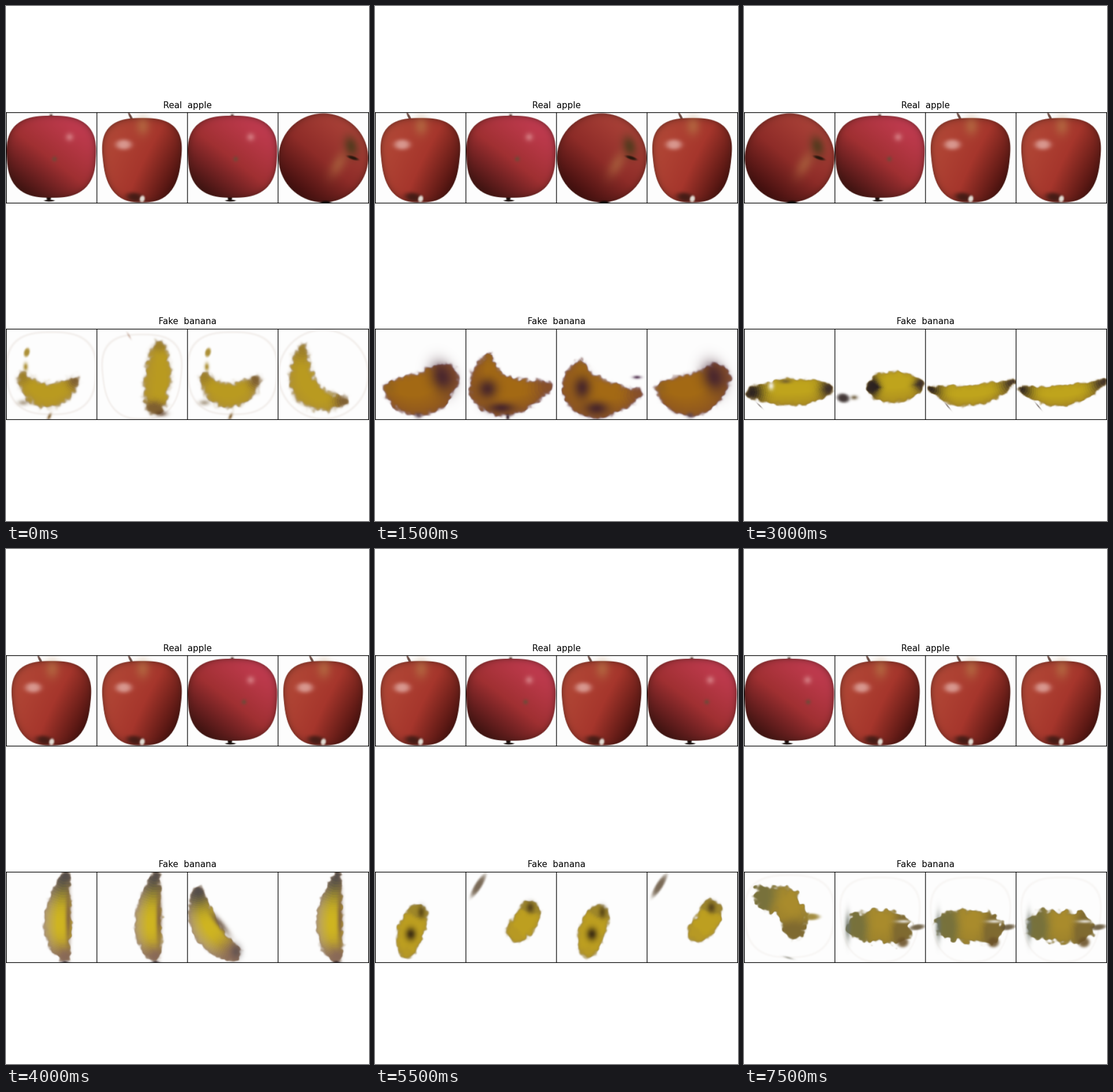
A matplotlib script that plays this animation: 628x892 px, repeating every 8 s.

```python
import numpy as np
import matplotlib.pyplot as plt
from matplotlib.animation import FuncAnimation
from matplotlib.colors import to_rgb

W, H = 628, 892
N, PAD = 128, 2  # tile resolution; black gap in the doubled-up grid
Y, X = (np.mgrid[0:N, 0:N] + 0.5) * 155.5 / N + 1.2


# ---------- painting helpers ----------
def blank():
    return np.full((N, N, 3), 0.995)


def mix(img, color, alpha):
    img += (color - img) * alpha[..., None]


def ramp(t, *colors):
    stops = np.linspace(0, 1, len(colors))
    channels = zip(*map(to_rgb, colors))
    return np.stack([np.interp(t, stops, c) for c in channels], axis=-1)


def dab(img, x, y, rx, ry, color, alpha=1.0, tilt=0, hard=1):
    c, s = np.cos(np.radians(tilt)), np.sin(np.radians(tilt))
    u = ((X - x) * c + (Y - y) * s) / rx
    v = ((Y - y) * c - (X - x) * s) / ry
    mix(img, to_rgb(color), alpha * np.exp(-(u * u + v * v) ** hard))


def wobble(rng, sigma=2.2):
    """Smooth random field with unit deviation."""
    i = np.arange(N)
    g = np.exp(-(i[:, None] - i) ** 2 / (2 * sigma ** 2))
    field = g @ rng.normal(size=(N, N)) @ g
    return field / field.std()


# ---------- apples: tapered superellipses with a slanted light ----------
# centre x, y, radius x, y, power, taper
BODY = {"A": (78.5, 77, 77, 71, 2.7, 0.04),
        "B": (78.5, 83, 67.5, 73, 2.7, 0.12),
        "C": (79, 79, 77.5, 77, 2.0, 0.0)}
# light direction, then dark, middle and bright skin
LIGHT = {"A": (0.30, -0.36, "#3c1210", "#a03032", "#c43c52"),
         "B": (-0.38, -0.20, "#3c0c0a", "#a6362c", "#b44a38"),
         "C": (0.30, -0.36, "#360a0a", "#8e2c28", "#ae443a")}


def apple_field(kind):
    cx, cy, rx, ry, p, taper = BODY[kind]
    v = (Y - cy) / ry
    u = (X - cx) / (rx * (1 - taper * v))
    return 1 - (abs(u) ** p + abs(v) ** p) ** (1 / p), u, v


def apple(kind, core):
    img = blank()
    if kind == "A":
        dab(img, 78, 6, 3, 3, "#4a2a22", 0.9)
        dab(img, 74, 148, 4, 6, "#1c0c0a", 1, 0, 3)
        dab(img, 75, 153, 9, 1.8, "#1c1210", 1, 0, 3)
    elif kind == "B":
        dab(img, 59, 8, 2.2, 9, "#6b4a42", 1, -28, 3)
    f, u, v = apple_field(kind)
    lx, ly, *skin = LIGHT[kind]
    color = ramp(0.52 + lx * u + ly * v, *skin)
    mix(color, to_rgb("#3c1812"), 0.45 * np.exp(-np.clip(f, 0, 1) * 16))
    mix(img, color, np.clip(0.5 + f * 60, 0, 1))
    if kind == "A":
        dab(img, 110, 43, 7, 7, "#dc8c90", 0.65)
        dab(img, core, 81, 4.5, 4.5, "#6e4a38", 0.8)
    elif kind == "B":
        dab(img, 80, 24, 12, 16, "#b8804a", 0.5)
        dab(img, 47, 56, 14, 9, "#e6b3ac", 0.75, 0, 1.5)
        dab(img, 66, 147, 15, 8, "#3a1a14", 0.85, 8, 1.5)
        dab(img, 79, 150, 4.5, 6, "#e4ddd4", 1, 15, 2)
    else:
        dab(img, 105, 90, 12, 24, "#b07444", 0.5, 30)
        dab(img, 127, 59, 12, 18, "#4c3a1c", 0.85, -15)
        dab(img, 130, 79, 10, 3, "#24160c", 0.95, 18, 2)
        dab(img, 83, 156, 9, 3, "#180806", 1, 0, 2)
    return img


# ---------- bananas: a bent spine of circles, each key point (x, y, radius) ----------
def bend(start, middle, end, rng, ragged):
    a, m, b = map(np.array, (start, middle, end))
    c = 2 * m - (a + b) / 2
    t = np.linspace(0, 1, 40)[:, None]
    x, y, r = (a * (1 - t) ** 2 + 2 * c * t * (1 - t) + b * t ** 2).T
    dx, dy = np.gradient(x), np.gradient(y)
    step = np.hypot(dx, dy)
    gap = np.hypot(X - x[:, None, None], Y - y[:, None, None]) - r[:, None, None]
    k = gap.argmin(axis=0)
    side = ((Y - y[k]) * dx[k] - (X - x[k]) * dy[k]) / (step * r)[k]
    return gap.min(axis=0) + ragged * wobble(rng), t[k, 0], side


STYLES = []


def style(body, shade, start, end, rim, tip=0.1, soft=0.8, ragged=1.2, ghost=0, bits=(), **spines):
    STYLES.append(dict(body=body, shade=shade, start=start, end=end, rim=rim, tip=tip,
                       soft=soft, ragged=ragged, ghost=ghost, bits=bits, spines=spines))


def banana(s, kind, rng):
    img = blank()
    if s["ghost"]:
        mix(img, to_rgb("#b49a88"), s["ghost"] * np.exp(-(apple_field(kind)[0] * 35) ** 2))
    gap, t, side = bend(*s["spines"][kind], rng, s["ragged"])
    color = ramp(0.5 + 0.5 * side, s["body"], s["body"], s["shade"])
    mix(color, to_rgb(s["start"]), np.exp(-(t / s["tip"]) ** 2))
    mix(color, to_rgb(s["end"]), np.exp(-((1 - t) / s["tip"]) ** 2))
    mix(color, to_rgb(s["rim"]), 0.7 * np.exp(np.clip(gap, -40, 0) / 2.5))
    mix(img, color, 1 / (1 + np.exp(np.clip(gap / s["soft"], -30, 30))))
    for owner, *bit in s["bits"]:
        if owner == kind:
            dab(img, *bit)
    return img


# mustard patches inside a pale apple outline
style("#ba9b20", "#b4942a", "#a08228", "#806030", "#7a5a2c", soft=1.5, ragged=1.5, ghost=0.13,
      A=((30, 84, 9), (70, 116, 21), (119, 90, 8)),
      B=((109, 31, 10), (106, 82, 22), (101, 134, 16)),
      C=((43, 38, 9), (51, 108, 23), (112, 125, 8)),
      bits=[("A", 36, 41, 5, 8, "#a88a2c", 0.95, 15, 2), ("A", 34, 66, 4, 7, "#a88a2c", 0.9),
            ("A", 75, 152, 3, 6, "#8a6a3a", 0.9, 25), ("A", 30, 128, 9, 5, "#8a7658", 0.6),
            ("B", 112, 147, 10, 5, "#5a3c22", 0.7), ("B", 56, 12, 2, 6, "#c0a090", 0.6, -30)])
# bronze with purple bruises
style("#a46a14", "#8e5620", "#98641a", "#885028", "#67405a", soft=1, ragged=1.5,
      A=((43, 43, 3), (50, 110, 36), (140, 101, 10)),
      B=((27, 104, 13), (78, 114, 37), (120, 84, 24)),
      C=((46, 55, 4), (54, 114, 36), (142, 113, 8)),
      bits=[("A", 38, 104, 17, 17, "#40202c", 0.85), ("A", 62, 137, 22, 9, "#40202c", 0.85),
            ("A", 73, 153, 3, 5, "#2c1620", 0.9), ("B", 116, 84, 19, 26, "#43222e", 0.85, -20),
            ("B", 75, 150, 6, 5, "#5a4450", 0.7), ("C", 45, 102, 15, 20, "#40202c", 0.85),
            ("C", 70, 138, 20, 12, "#40202c", 0.85), ("C", 140, 84, 7, 3, "#5a3c58", 0.9)])
# clean yellow, lying flat
style("#c0a51c", "#ae9020", "#2c2220", "#3c2e28", "#8a6c28", tip=0.14, soft=0.7,
      A=((74, 101, 18), (106, 101, 27), (147, 96, 8)),
      B=((8, 103, 5), (80, 116, 18), (152, 92, 5)),
      C=((14, 110, 10), (85, 110, 23), (146, 104, 9)),
      bits=[("A", 15, 120, 11, 8, "#2e2220", 0.9, 10, 2), ("A", 34, 119, 6, 4, "#6a5838", 0.8),
            ("B", 39, 134, 7, 1, "#3a2c26", 0.7, 50), ("C", 27, 133, 6, 1, "#3a2c26", 0.6, 45),
            ("C", 47, 99, 5, 7, "#ffffff", 0.8), ("C", 72, 91, 10, 4, "#75602c", 0.8)])
# upright, with a grey stalk
style("#d0b620", "#b6a074", "#524c4a", "#8a6a58", "#8c7258", tip=0.22, soft=0.7,
      A=((20, 32, 8), (33, 98, 24), (80, 141, 13)),
      B=((103, 6, 7), (89, 88, 23), (101, 146, 10)),
      bits=[("A", 57, 90, 6, 24, "#6c5440", 0.8, -40), ("A", 85, 138, 9, 12, "#5c5050", 0.7),
            ("B", 108, 80, 5, 45, "#7c5c40", 0.8), ("B", 102, 156, 6, 2, "#38282a", 0.8)])
# stubby, spotted
style("#bea020", "#bea020", "#a08828", "#b89a24", "#86703a",
      A=((111, 68, 19), (103, 87, 21), (89, 103, 19)),
      B=((72, 75, 19), (62, 104, 23), (55, 135, 15)),
      bits=[("A", 112, 62, 7, 9, "#4c3a18", 0.8), ("A", 22, 24, 6, 22, "#6c5a44", 0.9, 32, 2),
            ("B", 62, 108, 9, 11, "#2e2010", 0.85), ("B", 80, 70, 6, 10, "#4a3812", 0.7)])
# greyish
style("#a8963a", "#8c7862", "#66625e", "#867250", "#8c7e5c", tip=0.2, ragged=1.5,
      A=((10, 42, 5), (48, 118, 34), (112, 102, 14)),
      B=((91, 6, 7), (82, 64, 17), (77, 116, 40)),
      C=((14, 36, 5), (44, 108, 32), (92, 138, 17)),
      bits=[("B", 82, 120, 30, 32, "#8c7a62", 0.7), ("C", 113, 126, 10, 2, "#b0a8a0", 0.6)])
# ragged olive scraps inside a faint outline
style("#aa8c2c", "#a0842c", "#78723c", "#806a30", "#7c6c38", tip=0.2, ragged=2.5, ghost=0.07,
      A=((38, 44, 20), (76, 60, 24), (86, 98, 19)),
      B=((45, 94, 25), (80, 94, 28), (108, 98, 25)),
      bits=[("A", 116, 78, 15, 6, "#98802c", 0.9, 0, 2), ("A", 77, 149, 8, 2, "#8c8c80", 0.6, 15),
            ("B", 23, 95, 5, 22, "#6c7468", 0.8), ("B", 118, 122, 10, 9, "#6c5228", 0.9, 0, 2),
            ("B", 143, 96, 13, 5, "#665638", 0.9, -8, 2), ("B", 120, 86, 13, 3, "#ffffff", 0.7)])

# ---------- training steps: banana style and the apples in order ----------
STEPS = [(0, "ABAC"), (0, "BACA"), (1, "CBAB"), (1, "BACB"), (1, "ABCB"), (2, "BCBA"),
         (2, "CABB"), (3, "ABBA"), (3, "BBAB"), (3, "ABAB"), (4, "ABBA"), (4, "BABA"),
         (5, "BCAB"), (5, "ABBC"), (6, "BABA"), (6, "ABBB")]


def grid(tiles):
    """Doubled tiles in one row with black gaps around them."""
    size, pitch = 2 * N, 2 * N + PAD
    out = np.zeros((pitch + PAD, pitch * len(tiles) + PAD, 3))
    for k, tile in enumerate(tiles):
        x = PAD + k * pitch
        out[PAD:PAD + size, x:x + size] = tile.repeat(2, axis=0).repeat(2, axis=1)
    return np.clip(out, 0, 1)


def rows(step):
    number, kinds = STEPS[step]
    rng = np.random.default_rng(step)
    core = 84 + 1.8 * step
    return (grid([apple(k, core) for k in kinds]),
            grid([banana(STYLES[number], k, rng) for k in kinds]))


FRAMES = [rows(step) for step in range(len(STEPS))]

fig, axes = plt.subplots(2, 1, figsize=(W / 100, H / 100), dpi=100, facecolor="white")
fig.subplots_adjust(left=0, right=1, bottom=0.11, top=0.88, hspace=0.2)
views = []
for ax, title, row in zip(axes, ("Real  apple", "Fake  banana"), FRAMES[0]):
    views.append(ax.imshow(row))
    ax.set_title(title, family="DejaVu Sans", fontsize=10.8, pad=5.4)
    ax.axis("off")


def show(step):
    for view, row in zip(views, FRAMES[step]):
        view.set_data(row)
    return views


anim = FuncAnimation(fig, show, frames=len(STEPS), interval=500, repeat=True, repeat_delay=0)
plt.show()
```
